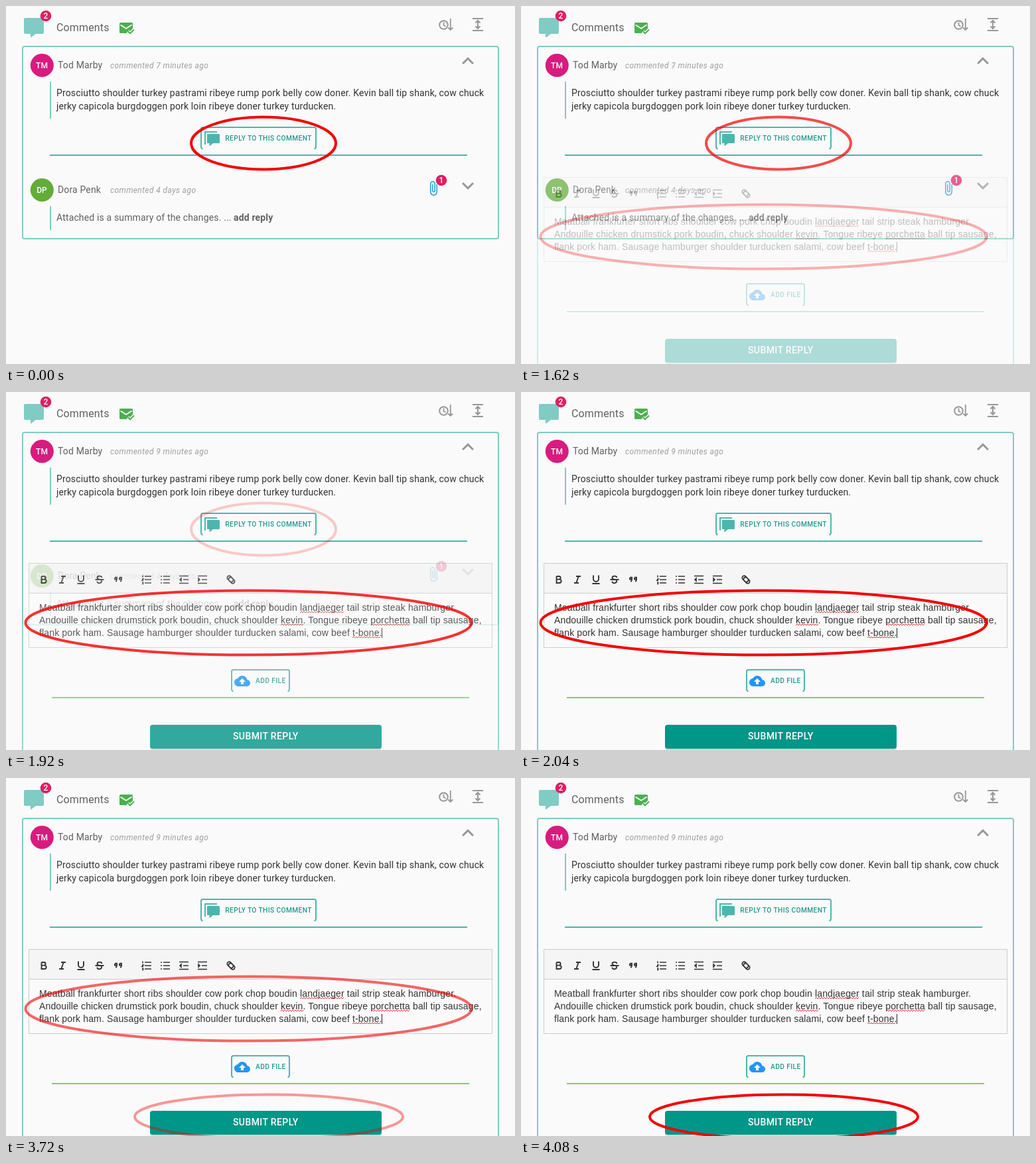
An HTML page that plays this animation: 767 by 540 pixels, repeating every 9080 ms.

```html
<!DOCTYPE html>
<html lang="en">
<head>
<meta charset="utf-8">
<title>Replying to a comment</title>
<style>
html, body { margin: 0; width: 100%; height: 100%; overflow: hidden; background: #fafafa; }
svg { display: block; width: 767px; height: 540px; }
text { font-family: Roboto, sans-serif; white-space: pre; }
.body { font-size: 14px; letter-spacing: .01071em; fill: #333; }
.soft { fill: #616161; }
.when { font-size: 12px; font-style: italic; letter-spacing: .03333em; fill: #9e9e9e; }
.edit { font: 14px "Liberation Sans", Arial, sans-serif; letter-spacing: .01071em; fill: #333; }
.btn { font-size: 10.2px; font-weight: 500; letter-spacing: .4px; fill: #26988e; }
.mid { font-size: 12px; font-weight: 500; fill: #fff; text-anchor: middle; }
.line { fill: none; }
.ring { fill: none; stroke: #f40000; stroke-width: 4; }
</style>
</head>
<body>
<svg viewBox="0 0 767 540" xmlns="http://www.w3.org/2000/svg">
  <rect width="767" height="540" fill="#fafafa"/>

  <!-- header -->
  <path d="M29 18H55a2 2 0 0 1 2 2V40a2 2 0 0 1-2 2H45L37 48V42H29a2 2 0 0 1-2-2V20a2 2 0 0 1 2-2z" fill="#80cbc4"/>
  <circle cx="60" cy="15" r="8.3" fill="#e01e63"/>
  <text class="mid" x="60" y="19.3">2</text>
  <text x="76" y="38" font-size="16" letter-spacing=".15" fill="#616161">Comments</text>
  <rect x="171" y="25" width="20" height="16" rx="1.5" fill="#4caf50"/>
  <path class="line" d="M172.5 28.5L181 34L189.5 28.5" stroke="#fafafa" stroke-width="1.8"/>
  <path class="line" d="M183.5 38.2L187 41.5L193 35.5" stroke="#fafafa" stroke-width="5"/>
  <path class="line" d="M183.8 38.2L187 41.3L193 35.5" stroke="#4caf50" stroke-width="2"/>
  <g class="line" stroke="#979797" stroke-width="2">
    <circle cx="659.5" cy="28.5" r="6.3"/>
    <path d="M659.5 24.5V29L662.5 30.8M669.8 19V35.5M666.3 32.5L669.8 36L673.3 32.5" stroke-width="1.8"/>
    <path d="M703 19H719M703 37H719M711 22V34M707.5 25.5L711 22L714.5 25.5M707.5 30.5L711 34L714.5 30.5"/>
  </g>

  <!-- first comment -->
  <rect class="line" x="25" y="61" width="717" height="290" rx="3" stroke="#80cbc4" stroke-width="2"/>
  <circle cx="54.3" cy="89.5" r="17.5" fill="#d81b7e"/>
  <text class="mid" x="54" y="94">TM</text>
  <text class="body soft" x="78" y="94">Tod Marby</text>
  <text class="when" x="157" y="94">commented 7 minutes ago</text>
  <path d="M12 8l-6 6 1.41 1.41L12 10.83l4.59 4.58L18 14z" transform="translate(678 65) scale(1.5)" fill="#979797"/>
  <rect x="66" y="114" width="2" height="56" fill="#80cbc4"/>
  <text class="body" x="76" y="136">Prosciutto shoulder turkey pastrami ribeye rump pork belly cow doner. Kevin ball tip shank, cow chuck</text>
  <text class="body" x="76" y="156">jerky capicola burgdoggen pork loin ribeye doner turkey turducken.</text>
  <path class="line" d="M296.5 215.5Q294 215 294 212V185.500Q294 183 296.500 183H464.500Q467 183 467 185.500V212Q467 215 464.500 215.500" stroke="#4db6ac" stroke-width="2"/>
  <path class="line" d="M300 209V190H318" stroke="#4db6ac" stroke-width="2"/>
  <path d="M304 193H320.500Q322 193 322 194.500V205.500Q322 207 320.500 207H312L306.500 211.500V207H304Q303 207 303 206V194Q303 193 304 193z" fill="#4db6ac"/>
  <text class="btn" x="330.300" y="203.300">REPLY TO THIS COMMENT</text>
  <rect x="66" y="224" width="629" height="2" fill="#4db6ac"/>

  <!-- second comment -->
  <circle cx="54.3" cy="277.5" r="17.5" fill="#62ac38"/>
  <text class="mid" x="54" y="282">DP</text>
  <text class="body soft" x="78" y="282">Dora Penk</text>
  <text class="when" x="157" y="282">commented 4 days ago</text>
  <path d="M16.5 6v11.5c0 2.21-1.79 4-4 4s-4-1.79-4-4V5c0-1.38 1.12-2.5 2.500-2.500s2.500 1.120 2.500 2.500v10.500c0 .55-.45 1-1 1s-1-.45-1-1V6H10v9.500c0 1.380 1.120 2.500 2.500 2.500s2.500-1.120 2.500-2.500V5c0-2.210-1.790-4-4-4S7 2.790 7 5v12.500c0 3.040 2.460 5.500 5.500 5.500s5.500-2.460 5.500-5.500V6z" transform="translate(632 263)" fill="#1e9bd7"/>
  <circle cx="656" cy="263" r="8.300" fill="#e01e63"/>
  <text class="mid" x="656" y="267.300">1</text>
  <path d="M16.590 8.590L12 13.170 7.410 8.590 6 10l6 6 6-6z" transform="translate(678 253) scale(1.5)" fill="#979797"/>
  <rect x="66" y="302" width="2" height="36" fill="#80cbc4"/>
  <text class="body soft" x="76" y="324">Attached is a summary of the changes. ...</text>
  <text class="body soft" x="343" y="324" font-weight="700">add reply</text>

  <!-- reply form -->
  <g id="form">
    <rect x="152" y="80" width="160" height="20" fill="#fafafa"/>
    <text class="when" x="157" y="94">commented 9 minutes ago</text>
    <rect x="20" y="230" width="727" height="310" fill="#fafafa"/>
    <path d="M25 230V540M742 230V540" stroke="#80cbc4" stroke-width="2"/>
    <rect x="34.5" y="258.5" width="698" height="45" fill="#f5f5f5" stroke="#ccc"/>
    <rect class="line" x="34.5" y="303.5" width="698" height="82" stroke="#ccc"/>
    <g id="tools" class="line" stroke="#333" stroke-width="1.9"></g>
    <text class="edit" x="50" y="330">Meatball frankfurter short ribs shoulder cow pork chop boudin landjaeger tail strip steak hamburger.</text>
    <text class="edit" x="50" y="349">Andouille chicken drumstick pork boudin, chuck shoulder kevin. Tongue ribeye porchetta ball tip sausage,</text>
    <text class="edit" x="50" y="368">flank pork ham. Sausage hamburger shoulder turducken salami, cow beef t-bone.</text>
    <path id="waves" class="line" stroke="#d9383a" stroke-width="1"/>
    <rect x="566" y="356" width="1" height="15" fill="#222"/>
    <path class="line" d="M342.500 451.500Q340 451 340 448V421.500Q340 419 342.500 419H424.500Q427 419 427 421.500V448Q427 451 424.500 451.500" stroke="#4db6ac" stroke-width="2"/>
    <path d="M19.350 10.040C18.670 6.590 15.640 4 12 4 9.110 4 6.600 5.640 5.350 8.040 2.340 8.360 0 10.910 0 14c0 3.310 2.690 6 6 6h13c2.760 0 5-2.240 5-5 0-2.640-2.050-4.780-4.650-4.960zM14 13v4h-4v-4H7l5-5 5 5z" transform="translate(344 424)" fill="#2196f3"/>
    <text class="btn" x="376" y="439.300">ADD FILE</text>
    <rect x="69" y="460" width="629" height="2" fill="#81c784"/>
    <rect x="217" y="503" width="349" height="37" rx="4" fill="#000" opacity=".16"/>
    <rect x="217" y="502" width="349" height="36" rx="4" fill="#009688"/>
    <text x="342" y="524" font-size="14" font-weight="500" letter-spacing=".4" fill="#fff">SUBMIT REPLY</text>
  </g>

  <ellipse id="ring1" class="ring" cx="388" cy="207" rx="109" ry="39.5"/>
  <ellipse id="ring2" class="ring" cx="365.500" cy="348" rx="336" ry="48.500"/>
  <ellipse id="ring3" class="ring" cx="396" cy="511" rx="202" ry="33.500"/>
</svg>
<script>
const $ = id => document.getElementById(id);
const LOOP = 9080, STEP = 60, STEPS = 10;

// Toolbar icons, each drawn around its own centre: [x, path]
const rows = "M-3-5H7M-3 0H7M-3 5H7";
const dent = "M-7-5.5H7M-1 0H7M-7 5.500H7";
const icons = [
  [57, "M-3.5-5V5H1a2.700 2.700 0 0 0 0-5.400H-3.500M.3-.4a2.300 2.300 0 0 0 0-4.600H-3.500"],
  [85, "M-2-5H5M-5 5H2M1.700-5L-1.700 5"],
  [113, "M-4-6.500V-1a4 4 0 0 0 8 0V-6.500M-5.500 6H5.500"],
  [141, "M3.500-3C3-6.300-3.600-6-3.500-2.700-3.400-1-1.500-.3 0 0M2.600 1C5 5.800-3.500 6.800-3.700 2.600M-6.500 0H6.500"],
  [169, "M-5-3.200H-2V.3L-3.500 3.300M2-3.200H5V.3L3.500 3.300M-5-3V-.5H-2M2-3V-.5H5"],
  [212, rows + "M-6-6.500V-3.500M-7-1H-5L-7 1.300H-5M-7 4H-5.500V6.500H-7"],
  [240, rows + "M-7-5H-5M-7 0H-5M-7 5H-5"],
  [268, dent + "M-4-2L-6 0L-4 2z"],
  [296, dent + "M-6-2L-4 0L-6 2z"],
  [339, "M-1.300 1.600A3 3 0 0 1-1.200-2.500M-2.700 3"]
];
const link = "M1-3H-3.500a3 3 0 0 0 0 6H1a3 3 0 0 0 2.400-1.300M-1 3H3.500a3 3 0 0 0 0-6H-1";

$("tools").innerHTML = icons.slice(0, -1).map(([x, d]) => {
  const thin = x > 200 ? 1.6 : 1.9;
  return `<path d="${d}" transform="translate(${x} 283)" stroke-width="${thin}"/>`;
}).join("") +
  `<path d="M.8-3H-3.800a3 3 0 0 0 0 6H.8a3 3 0 0 0 0-6M-.8 3H3.800a3 3 0 0 0 0-6H-.8a3 3 0 0 0 0 6" transform="translate(339 283) rotate(45)" stroke-width="1.7"/>`;

// Spelling marks
const wave = (x, end, y) => {
  let d = `M${x} ${y + 1}`;
  for (let i = 1; x + i * 2 <= end; i++) d += `L${x + i * 2} ${y + (i % 2 ? -1 : 1)}`;
  return d;
};
$("waves").setAttribute("d",
  wave(443, 510, 332) + wave(414, 448, 351) + wave(550, 609, 351) + wave(522, 565, 370));

// Stepped cross-fade from 0 to 1
const fade = (t, start) =>
  t < start ? 0 : Math.min(STEPS, Math.floor((t - start) / STEP) + 1) / STEPS;
const show = (id, a) => $(id).setAttribute("opacity", a);

function draw(t) {
  const open = fade(t, 1500), send = fade(t, 3540);
  show("form", open);
  show("ring1", 1 - open);
  show("ring2", open * (1 - send));
  show("ring3", send);
}

function tick() {
  draw(performance.now() % LOOP);
  requestAnimationFrame(tick);
}
tick();
</script>
</body>
</html>
```
